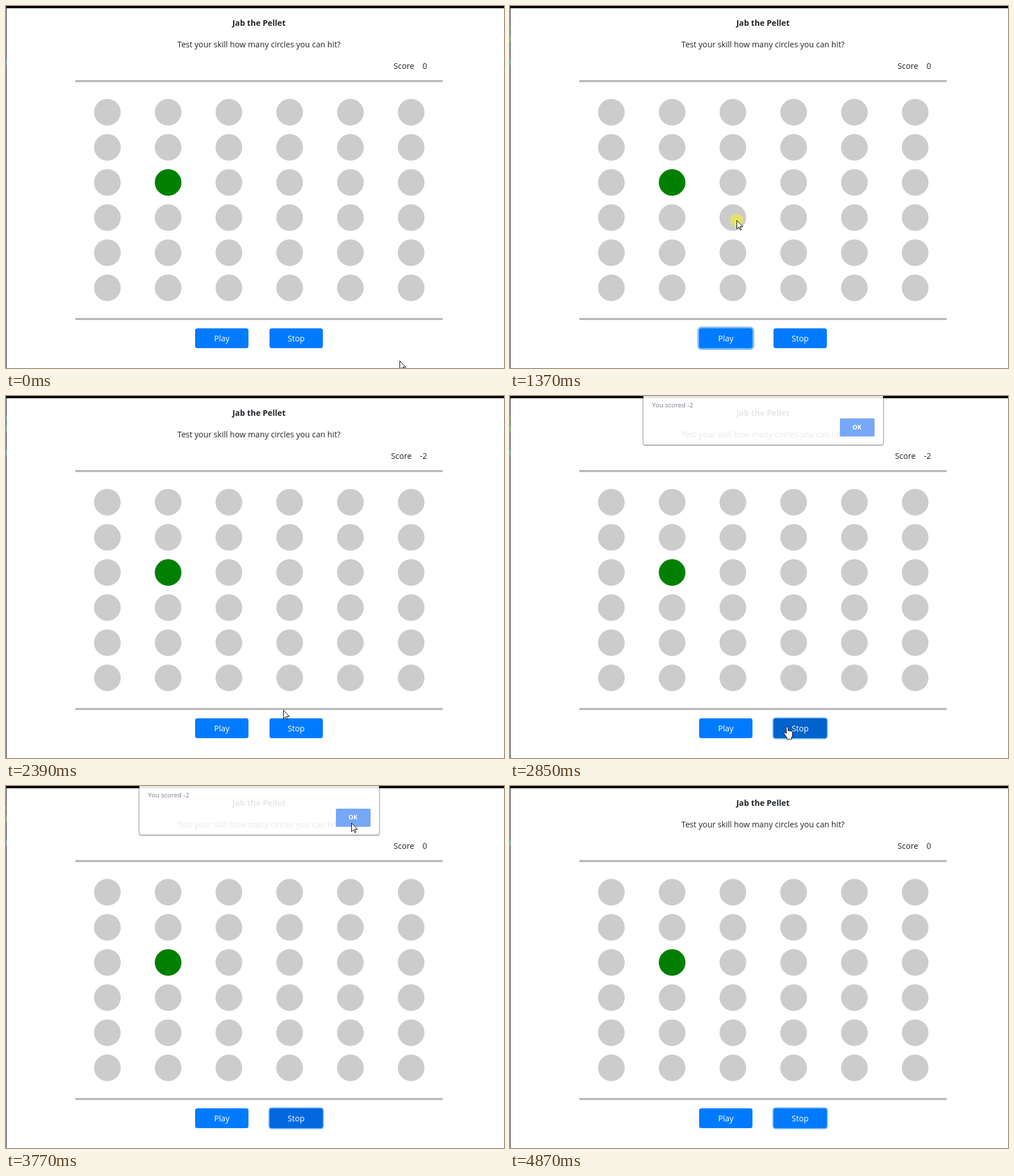
These frames come from a looping animation (877 by 639 pixels, 4.95 s). An HTML page:

```html
<!DOCTYPE html>
<html lang="en">
<head>
<meta charset="utf-8">
<title>Jab the Pellet</title>
<style>
  html, body { margin: 0; width: 100%; height: 100%; overflow: hidden; background: #fff; }
  body { position: relative; font: 14.15px/19px "Open Sans", "Noto Sans", sans-serif; color: #212529; }
  body *, .edge::after { position: absolute; box-sizing: border-box; white-space: pre; }

  .bar { left: 0; top: 0; width: 877px; height: 4px; background: #000; }
  .edge { left: 0; top: 0; width: 1px; height: 639px;
    background: linear-gradient(#0000 96px, #1d7f80 96px 104px, #0000 104px) #2b2b2b; }
  .edge::after { content: ""; left: 0; top: 36px; width: 1px; height: 27px;
    background: linear-gradient(#3f8a2e 5px, #2b2b2b 5px 16px, #3f8a2e 16px);
    animation: specks 4950ms step-end infinite; }
  .line { left: 0; width: 891px; text-align: center; }
  .title { top: 20px; font-weight: 700; }
  .intro { top: 58px; }
  .rule { left: 122px; width: 647px; border-top: 3px double #808080; }

  .score { top: 96px; right: 135.3px; width: max-content; animation: 4950ms step-end infinite; }
  .score b { position: static; font-weight: 400; margin-left: 14.6px; }
  .zero { animation-name: zero; }
  .one { animation-name: one; }
  .two { animation-name: two; }

  .dot { width: 47px; height: 47px; border-radius: 50%; background: #ccc; }
  .lit { background: green; }

  .btn { top: 569px; width: 94px; height: 35px; border-radius: 4px; background: #007bff;
    color: #fff; line-height: 35px; text-align: center; animation: 4950ms linear infinite; }
  .play { left: 333px; animation-name: play; }
  .stop { left: 464px; animation-name: stop; }

  .pane, .msg { left: 235px; top: 0; width: 422px; height: 86px; animation: 4950ms linear infinite; }
  .pane { background: #fff; border-radius: 0 0 3px 3px; animation-name: pane;
    box-shadow: 0 0 1px 1px rgba(0,0,0,.3), 0 1px 3px rgba(0,0,0,.5); }
  .msg { animation-name: msg; }
  .msg p { left: 15px; top: 8px; margin: 0; font-size: 11.6px; line-height: 16px; color: #4d4d60; }
  .ok { left: 345.5px; top: 40px; width: 61px; height: 31.5px; border-radius: 2px; background: #4285f4;
    color: #fff; font-size: 11px; font-weight: 700; line-height: 30px; text-align: center; }

  .cursor { left: 0; top: 0; width: 1px; height: 1px; overflow: visible; animation: move 4950ms linear infinite; }
  .cursor path { fill: #fff; stroke: #000; stroke-linejoin: round; }
  .cursor * { animation: 4950ms step-end infinite; }
  .cursor circle { fill: rgba(255,245,0,.5); animation-name: click; }
  .cursor .arrow { animation-name: arrow; }
  .cursor .hand { animation-name: hand; }

  @keyframes specks { 0%, 98.38% { opacity: 0 } 1.41% { opacity: 1 } }
  @keyframes zero { 0%, 76.16% { opacity: 1 } 29.49% { opacity: 0 } }
  @keyframes one { 0%, 41.82% { opacity: 0 } 29.49% { opacity: 1 } }
  @keyframes two { 0%, 76.16% { opacity: 0 } 41.82% { opacity: 1 } }

  @keyframes play {
    0%, 8.5% { background: #007bff; box-shadow: 0 0 0 0 rgba(0,123,255,.5) }
    10% { background: #0069d9; box-shadow: 0 0 0 0 rgba(0,123,255,.5) }
    11.9%, 13.94% { background: #0069d9; box-shadow: 0 0 0 3px rgba(0,123,255,.5) }
    16.97%, 29.2% { background: #007bff; box-shadow: 0 0 0 3px rgba(0,123,255,.5) }
    30.9%, 100% { background: #007bff; box-shadow: 0 0 0 0 rgba(0,123,255,.5) }
  }
  @keyframes stop {
    0%, 50.6% { background: #007bff; box-shadow: 0 0 0 0 rgba(0,123,255,.5) }
    53.3% { background: #0069d9; box-shadow: 0 0 0 0 rgba(0,123,255,.5) }
    55%, 75.1% { background: #0062cc; box-shadow: 0 0 0 2px rgba(0,123,255,.45) }
    76.1%, 77.5% { background: #0069e0; box-shadow: 0 0 0 2px rgba(0,123,255,.45) }
    79.8%, 98.37% { background: #007bff; box-shadow: 0 0 0 3px rgba(0,123,255,.5) }
    98.38%, 100% { background: #007bff; box-shadow: 0 0 0 2px rgba(0,123,255,.45) }
  }
  @keyframes pane {
    0%, 56.2% { opacity: 0 }
    57.5%, 59% { opacity: .9 }
    59.19%, 75.2% { opacity: 1 }
    76.1%, 77.8% { opacity: .9 }
    79.4%, 100% { opacity: 0 }
  }
  @keyframes msg {
    0%, 56.2% { opacity: 0; transform: translateY(-1px) }
    57.5%, 59% { opacity: .72; transform: translateY(-.5px) }
    59.19%, 75.2% { opacity: 1; transform: none }
    76.1%, 77.8% { opacity: .72; transform: none }
    79.4%, 100% { opacity: 0; transform: none }
  }

  @keyframes move {
    0%, 1.41% { transform: translate(693px, 626px); opacity: 1; animation-timing-function: ease-out }
    9.1%, 13.74% { transform: translate(379px, 591px) }
    15.2%, 16.77% { transform: translate(384px, 348px) }
    19.8% { transform: translate(392px, 302px) }
    23.03% { transform: translate(399px, 372px) }
    24.65%, 30.9% { transform: translate(399px, 378px) }
    34.14%, 35.6% { transform: translate(397px, 310px) }
    35.76%, 41.82% { transform: translate(394px, 300px) }
    48.2%, 50.1% { transform: translate(488px, 554px) }
    51.72%, 55.2% { transform: translate(488px, 595px) }
    56.8%, 59% { transform: translate(488px, 584px) }
    59.19%, 60.6% { transform: translate(495px, 512px); animation-timing-function: ease-in-out }
    68.69%, 77.98% { transform: translate(608px, 65px) }
    82.8% { transform: translate(811px, 595px) }
    84.44%, 86.05% { transform: translate(801px, 619px); opacity: 1 }
    86.06%, 100% { transform: translate(801px, 619px); opacity: 0 }
  }
  @keyframes click {
    0%, 11.9%, 30.9%, 41.82%, 55%, 76.1% { opacity: 0 }
    9.1%, 27.6%, 38.79%, 53.3%, 75.15% { opacity: 1 }
  }
  @keyframes arrow { 0%, 14.1%, 59.1% { opacity: 1 } 7.9%, 50.8% { opacity: 0 } }
  @keyframes hand { 0%, 14.1%, 59.1% { opacity: 0 } 7.9%, 50.8% { opacity: 1 } }
</style>
</head>
<body>
  <div class="bar"></div>
  <div class="edge"></div>
  <div class="line title">Jab the Pellet</div>
  <div class="line intro">Test your skill how many circles you can hit?</div>
  <div class="score zero">Score<b>0</b></div>
  <div class="score one">Score<b>-1</b></div>
  <div class="score two">Score<b>-2</b></div>
  <div class="rule" style="top:131px"></div>
  <div id="board"></div>
  <div class="rule" style="top:551px"></div>
  <div class="btn play">Play</div>
  <div class="btn stop">Stop</div>
  <div class="pane"></div>
  <div class="msg"><p>You scored -2</p><div class="ok">OK</div></div>
  <svg class="cursor">
    <circle r="11"/>
    <path class="arrow" d="M.5 .5V15.5L4 12.2 6.4 17.5 8.4 16.6 6.1 11.5H11Z"/>
    <path class="hand" d="M-1.5 12V1.5a1.6 1.6 0 0 1 3.2 0V7q1.4-1.2 2.8.3 1.4-1 2.6.5 2-.8 2.4 1V14q0 3-1.8 5v3H-.3v-2.5L-5.3 12q-1-2 .8-2.3 1.6.2 3 2.3z"/>
  </svg>
<script>
  const board = document.getElementById("board");
  board.style.cssText = "left:155px;top:164px";
  for (let row = 0; row < 6; row++) {
    for (let col = 0; col < 6; col++) {
      const dot = document.createElement("div");
      dot.className = row === 2 && col === 1 ? "dot lit" : "dot";
      dot.style.left = col * 107 + "px";
      dot.style.top = row * 62 + "px";
      board.append(dot);
    }
  }
</script>
</body>
</html>
```
